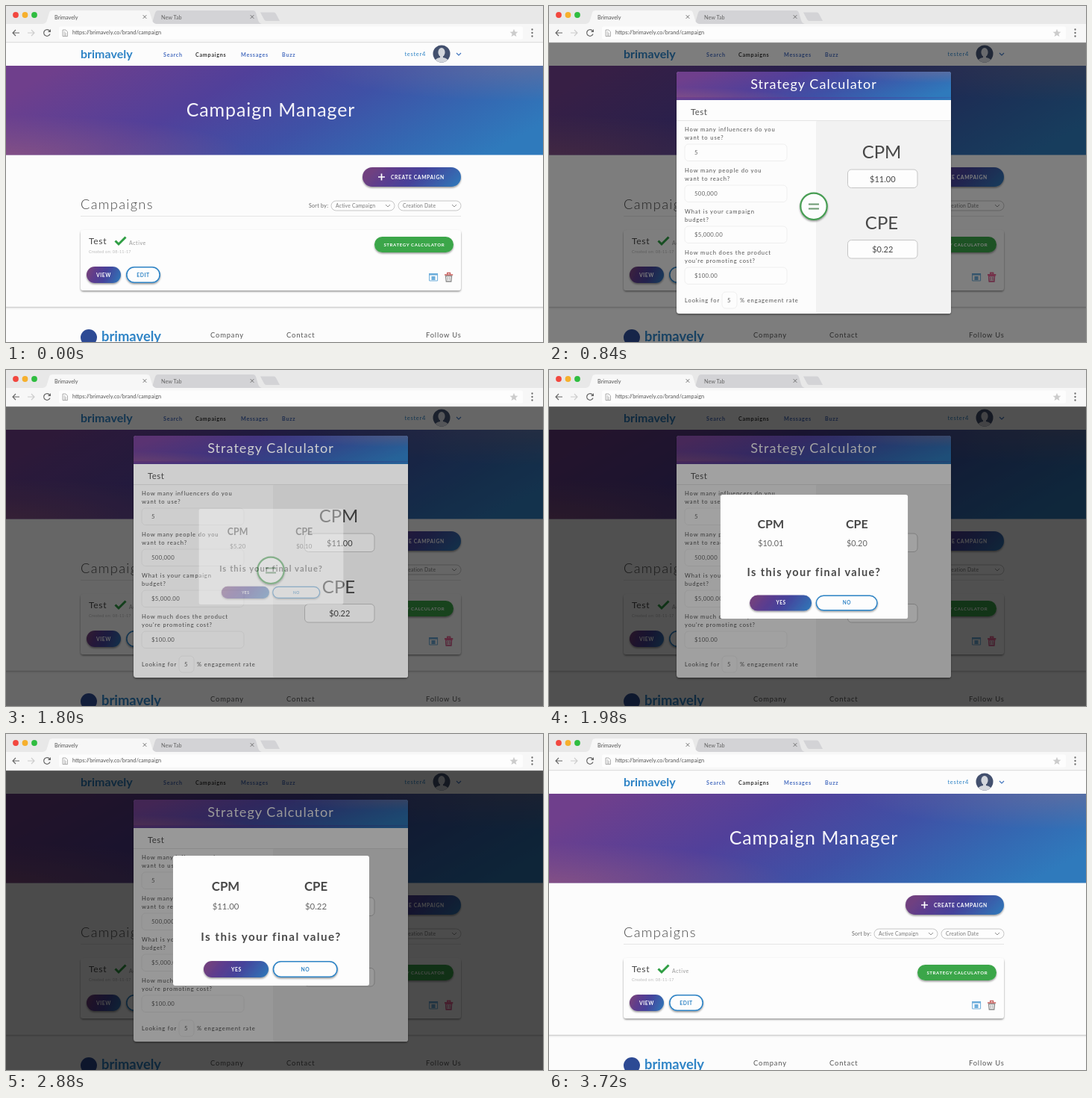
An HTML page for the animation above (3840 ms loop, 720 px wide and 450 px high).

```html
<!DOCTYPE html>
<html lang="en">
<head>
<meta charset="utf-8">
<title>Campaign Manager</title>
<style>
  html, body { margin: 0; width: 100%; height: 100%; overflow: hidden; background: #fdfdfd; }
  svg { display: block; width: 720px; height: 450px; }
  text { font-family: Lato, "Open Sans", sans-serif; white-space: pre; }
</style>
</head>
<body>
<svg id="stage" viewBox="0 0 720 450" xmlns="http://www.w3.org/2000/svg">
  <defs>
    <linearGradient id="hero" x1="0" y1=".35" x2="1" y2=".65">
      <stop offset="0" stop-color="#6f3f8c"/><stop offset=".34" stop-color="#51409a"/>
      <stop offset=".6" stop-color="#3f51a6"/><stop offset=".82" stop-color="#3468b2"/>
      <stop offset="1" stop-color="#2f7abc"/>
    </linearGradient>
    <radialGradient id="rose" cx="0" cy="1" r=".45">
      <stop offset="0" stop-color="#96587e" stop-opacity=".65"/><stop offset="1" stop-color="#96587e" stop-opacity="0"/>
    </radialGradient>
    <radialGradient id="haze" cx=".97" cy="0" r=".4">
      <stop offset="0" stop-color="#74759a" stop-opacity=".55"/><stop offset="1" stop-color="#74759a" stop-opacity="0"/>
    </radialGradient>
    <linearGradient id="pill" x1="0" y1=".7" x2="1" y2=".9">
      <stop offset="0" stop-color="#704180"/><stop offset=".2" stop-color="#5c3c8e"/>
      <stop offset=".5" stop-color="#45439b"/><stop offset="1" stop-color="#2f78b9"/>
    </linearGradient>
    <filter id="soft" x="-10%" y="-20%" width="120%" height="160%">
      <feDropShadow dx="0" dy="1.5" stdDeviation="1.2" flood-color="#000" flood-opacity=".42"/>
    </filter>
    <clipPath id="round"><circle cx="584" cy="64" r="11.5"/></clipPath>
  </defs>
  <g id="page"></g>
  <rect id="dim" y="49" width="720" height="401"/>
  <g id="modal"></g>
  <rect id="dim2" y="49" width="720" height="401"/>
  <g id="dialog"></g>
  <g id="chrome"></g>
</svg>
<script>
const $ = id => document.getElementById(id);
const BRAND = "brimavely";
const BLUE = "#2f84c6", GREEN = "#3aa648", INK = "#484848";

const text = (x, y, str, size, fill, o = {}) =>
  `<text x="${x}" y="${y}" font-size="${size}" fill="${fill}" font-weight="${o.w || 400}"` +
  ` letter-spacing="${o.ls || 0}" text-anchor="${o.a || "start"}"${o.id ? ` id="${o.id}"` : ""}>${str}</text>`;
const rect = (x, y, w, h, fill, more = "") =>
  `<rect x="${x}" y="${y}" width="${w}" height="${h}" fill="${fill}" ${more}/>`;
const line = (d, stroke, w = 1, more = "") =>
  `<path d="${d}" fill="none" stroke="${stroke}" stroke-width="${w}" ${more}/>`;
const disc = (x, y, r, fill) => `<circle cx="${x}" cy="${y}" r="${r}" fill="${fill}"/>`;
const banner = (x, y, w, h, more = "") =>
  ["hero", "rose", "haze"].map(id => rect(x, y, w, h, `url(#${id})`, more)).join("");
const chevron = (x, y, s, c, w = .9) => line(`M${x - s} ${y - s / 2}l${s} ${s} ${s} ${-s}`, c, w);
const cross = (x, y) => line(`M${x - 2.3} ${y - 2.3}l4.6 4.6m0 -4.6l-4.6 4.6`, "#666", .9);
const filled = (x, y, w, h, fill) => rect(x, y, w, h, fill, `rx="${h / 2}" filter="url(#soft)"`);
const hollow = (x, y, w, h) =>
  rect(x, y, w, h, "#fdfdfd", `rx="${h / 2}" stroke="${BLUE}" stroke-width="1.6" filter="url(#soft)"`);
const caption = (x, y, str, fill, size = 6.8) => text(x, y, str, size, fill, { w: 700, ls: .6, a: "middle" });

function drawChrome() {
  const tab = (x, w, fill) =>
    `<path d="M${x} 24q4 -1 5 -5l3 -10q1 -3 4 -3h${w - 24}q3 0 4 3l3 10q1 4 5 5z" fill="${fill}"/>`;
  return rect(0, 0, 720, 24, "#e8e8e8") +
    disc(13, 12, 3.9, "#f2473f") + disc(25.5, 12, 3.9, "#f6b02d") + disc(38, 12, 3.9, "#2fbd40") +
    tab(192, 151, "#d3d3d6") + tab(50, 151, "#f7f7f7") +
    `<path d="M341 8.500h18q2 0 3 2l5 9.500h-18q-2 0 -3 -2z" fill="#d3d3d6"/>` +
    text(65, 18, "Brimavely", 7.3, "#555") + text(208, 18, "New Tab", 7.3, "#666") +
    cross(186, 14.5) + cross(330, 14.5) +
    rect(0, 24, 720, 25, "#f7f7f7") + rect(71, 27.5, 622, 17, "#fdfdfd", 'rx="2"') +
    line("M0 48.700H720", "#d2d2d2", .8) +
    line("M18 36H9m4 -4l-4 4 4 4", "#666", 1.1) + line("M29 36h9m-4 -4l4 4 -4 4", "#ccc", 1.1) +
    line("M58.500 33.500A4.300 4.300 0 1 0 59 37.500", "#666", 1.2) +
    `<path d="M60 31v4h-4z" fill="#666"/>` +
    line("M76 32h4l2.500 2.500v6H76zM77.500 35h2m-2 2h3.500m-3.500 2h3.500", "#999", .8) +
    text(89, 38.3, `https://${BRAND}.co/brand/campaign`, 7.35, "#555") +
    `<path d="M681 30.800l1.500 3.600 3.900.3 -3 2.500 1 3.800 -3.400 -2.100 -3.400 2.100 1 -3.800 -3 -2.500 3.900 -.3z" fill="#ccc"/>` +
    [31.5, 36, 40.5].map(y => disc(705.5, y, 1.15, "#666")).join("");
}

function drawTrash(c, lid) {
  return line("M589.500 361.500l.8 7.500h6.500l.8 -7.500z", c, 1.3) + line("M592.300 363v4.500m2.600 0v-4.500", c, .9) +
    line("M588 360h11.200m-7.500 -.5v-2h3.800v2", lid, 1.4);
}

function drawPage() {
  const nav = (x, s, c) => text(x, 68, s, 7.2, c, { w: 700, ls: .72 });
  const foot = (x, s, a) => text(x, 444, s, 9.4, "#555", { ls: .85, a });
  const select = (x, w, s) =>
    rect(x, 261, w, 13, "#fdfdfd", 'rx="6.500" stroke="#b8b8b8" stroke-width=".8"') +
    text(x + 6, 270, s, 6.8, "#777", { ls: .2 }) + chevron(x + w - 9, 267.5, 3, "#777", .8);
  return rect(0, 49, 720, 401, "#fcfcfc") +
    text(100, 69.5, BRAND, 16, BLUE, { w: 700 }) +
    nav(211, "Search", "#4a6fc0") + nav(254, "Campaigns", "#333") +
    nav(315, "Messages", "#4a6fc0") + nav(370, "Buzz", "#4a6fc0") +
    text(563, 67, "tester4", 7.5, BLUE, { ls: .7, a: "end" }) +
    disc(584, 64, 11.5, "#43506e") +
    `<g clip-path="url(#round)" fill="#d3d6dc"><ellipse cx="584" cy="62" rx="4.600" ry="6"/>` +
    `<path d="M582 66h4v3q7 1 8 7h-20q1 -6 8 -7z"/></g>` +
    chevron(607, 64.5, 3, "#3f74bd", 1.1) +
    banner(0, 80, 720, 119.5) +
    text(355, 148, "Campaign Manager", 25, "#f5f4fa", { ls: .9, a: "middle" }) +
    filled(478, 216, 132, 26, "url(#pill)") +
    line("M503.500 224.500v9m-4.500 -4.500h9", "#fff", 1.7) +
    text(516, 231.7, "CREATE CAMPAIGN", 6.7, "#fff", { w: 700, ls: .65 }) +
    text(100, 272, "Campaigns", 18.3, INK, { w: 300, ls: 1.3 }) +
    text(406, 270, "Sort by:", 7, "#666", { ls: .3 }) +
    select(436, 85, "Active Campaign") + select(526, 84, "Creation Date") +
    line("M100 281.500H610", "#e2e2e2", .9) +
    rect(100, 300, 510, 81, "#fdfdfd", 'rx="4" filter="url(#soft)"') +
    text(111, 319, "Test", 12.2, INK, { ls: .6 }) +
    line("M146.500 314.500l4.500 4.500 9.500 -9.500", "#2f9e44", 3) +
    text(165, 320, "Active", 7, "#999", { ls: .55 }) +
    text(111, 331.3, "Created on: 08-11-17", 5.5, "#bbb", { ls: .2 }) +
    filled(494, 309, 106, 21, GREEN) + caption(547.3, 322, "STRATEGY CALCULATOR", "#fff", 6.1) +
    filled(108, 349, 46, 22, "url(#pill)") + caption(131, 362.6, "VIEW", "#fff") +
    hollow(161.8, 349.8, 44.4, 20.4) + caption(184, 362.6, "EDIT", BLUE) +
    line("M567.600 358.500h11v9.500h-11z", "#6eaedb", 1) + rect(567, 358, 12, 2.6, "#6eaedb") +
    rect(570.5, 362, 5, 5, "#6eaedb") +
    drawTrash("#8b8b8b", "#c8615f") + `<g id="bin">${drawTrash("#f0609a", "#f0609a")}</g>` +
    rect(0, 402.8, 720, 1.6, "#cfcfcf") + rect(0, 404.4, 720, 1.2, "#ededed") +
    disc(111, 444, 11, "#2d4a94") + text(128, 449, BRAND, 18.4, BLUE, { w: 700 }) +
    foot(274, "Company", "start") + foot(376, "Contact", "start") + foot(610.8, "Follow Us", "end");
}

function drawModal() {
  const label = (x, y, s) => text(x, y, s, 7.6, "#555", { ls: .85 });
  const box = (x, y, w, h) => rect(x, y, w, h, "#fdfdfd", 'rx="5" stroke="#ebebeb" stroke-width=".8"');
  const fields = [
    ["How many influencers do you", "want to use?", "5"],
    ["How many people do you", "want to reach?", "500,000"],
    ["What is your campaign", "budget?", "$5,000.00"],
    ["How much does the product", "you're promoting cost?", "$100.00"]
  ].map(([a, b, v], i) => {
    const y = 168 + i * 55;
    return label(182, y, a) + label(182, y + 11, b) + box(182, y + 17, 137, 22.5) +
      text(195, y + 31, v, 7.8, "#666", { ls: .3 });
  }).join("");
  const result = (name, y, v) =>
    text(446, y, name, 24, INK, { a: "middle" }) +
    rect(400.5, y + 15, 93.5, 24.5, "#fdfdfd", 'rx="5" stroke="#c6c6c6"') +
    text(447.3, y + 31.5, v, 11, INK, { a: "middle" });
  return rect(171, 88, 368, 324, "#fcfcfc", 'rx="4" filter="url(#soft)"') +
    rect(358, 153, 181, 259, "#f2f2f2", 'rx="3"') +
    banner(171, 88, 368, 38, 'rx="3"') + rect(171, 122, 368, 4, "url(#hero)") +
    rect(171, 126, 368, 27.5, "#fdfdfd") + line("M171 153.500H539", "#e2e2e2", .9) +
    text(355, 111, "Strategy Calculator", 18.1, "#fff", { ls: 1, a: "middle" }) +
    text(190, 146, "Test", 11.5, "#555", { ls: .4 }) + fields +
    label(182, 397, "Looking for") + box(232, 383, 20, 22) +
    text(239, 397, "5", 7.8, "#666") + label(256, 397, "% engagement rate") +
    `<circle cx="355" cy="268.300" r="17.700" fill="#fdfdfd" stroke="#479d52" stroke-width="2.200" filter="url(#soft)"/>` +
    line("M348 265.500h14m-14 6h14", "#6d9a72", 2) +
    result("CPM", 204, "$11.00") + result("CPE", 298.5, "$0.22");
}

function drawDialog() {
  const head = (x, s) => text(x, 210, s, 16.8, INK, { w: 700, a: "middle" });
  const value = (x, id) => text(x, 235.3, "", 11.4, "#666", { a: "middle", id });
  return rect(224, 163, 263, 174, "#fdfdfd", 'rx="3"') +
    head(294.5, "CPM") + head(415.5, "CPE") + value(294.5, "cpm") + value(415.5, "cpe") +
    text(355.5, 277, "Is this your final value?", 15.2, INK, { w: 700, ls: 1.45, a: "middle" }) +
    filled(265, 304, 87, 22, "url(#pill)") + caption(309, 317.5, "YES", "#fff") +
    hollow(358.5, 304.8, 85.500, 20.4) + caption(401.5, 317.5, "NO", BLUE);
}

$("chrome").innerHTML = drawChrome();
$("page").innerHTML = drawPage();
$("modal").innerHTML = drawModal();
$("dialog").innerHTML = drawDialog();

const LOOP = 3840, STEP = 60, GROW = 500, FADE = 250, SHRINK = 245;
const ramp = (t, start, len) => Math.min(1, Math.max(0, (t - start) / len));
const easeOut = x => 1 - (1 - x) ** 3;

// Grows from half size while fading in quickly; shrinks and fades together.
function pop(id, t, open, close, cx) {
  const grown = easeOut(ramp(t, open, GROW)), left = 1 - ramp(t, close, SHRINK);
  const s = .5 + .5 * grown * left, g = $(id);
  g.setAttribute("opacity", ramp(t, open, FADE) * left);
  g.setAttribute("transform", `translate(${cx} 250) scale(${s}) translate(${-cx} -250)`);
  return grown;
}

function render(t) {
  const modalIn = pop("modal", t, 157, 3300, 355);
  const dialogIn = pop("dialog", t, 1704, 3278, 355.5);
  const clear = 1 - ramp(t, 3420, 240);
  $("dim").setAttribute("opacity", .5 * modalIn * clear);
  $("dim2").setAttribute("opacity", .4 * dialogIn * clear);
  $("bin").setAttribute("opacity", modalIn * clear);
  $("cpm").textContent = "$" + (11 * dialogIn).toFixed(2);
  $("cpe").textContent = "$" + (.22 * dialogIn).toFixed(2);
}

const origin = performance.now();
function tick() {
  const t = (performance.now() - origin) % LOOP;
  render(Math.floor(t / STEP) * STEP);
  requestAnimationFrame(tick);
}
render(0);
requestAnimationFrame(tick);
</script>
</body>
</html>
```
